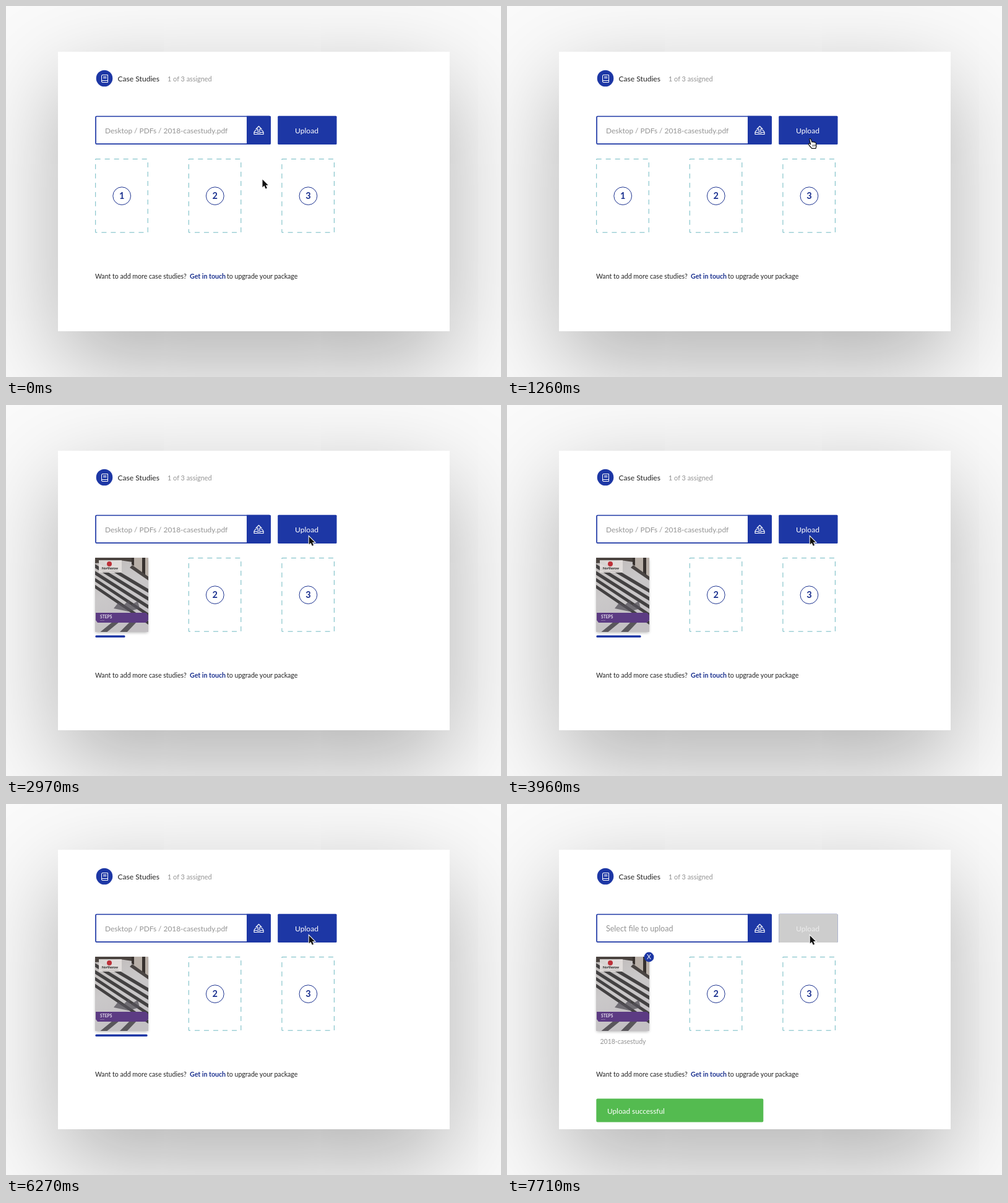
These frames come from a looping animation (800x600 px, 8 s). An HTML page:

```html
<!DOCTYPE html>
<html lang="en">
<head>
<meta charset="utf-8">
<title>Case study upload</title>
<style>
  html, body { margin: 0; width: 100%; height: 100%; overflow: hidden; background: #fafafa; }
  #card {
    position: absolute; left: 84px; top: 74px; width: 633px; height: 452px;
    background: #fff; box-shadow: 0 50px 150px rgba(0, 0, 0, .3);
  }
  svg { position: absolute; left: 0; top: 0; }
  text { font-family: Lato, "Open Sans", sans-serif; font-size: 12.1px; fill: #222; }
  .blue { fill: #1d37a5; }
  .line { fill: none; stroke: #fff; stroke-linecap: round; stroke-linejoin: round; }
  .hint { fill: #949494; }
  .small { font-size: 10.6px; }
  .bold { font-weight: 700; fill: #1b318f; }
  .mid { text-anchor: middle; }
  .white { fill: #fff; }
  .slot rect { fill: none; stroke: #70bac2; stroke-dasharray: 8 7; }
  .slot circle { fill: #fff; stroke: #1b318f; }
  .slot text { font-size: 14.5px; }
</style>
</head>
<body>
<div id="card"></div>
<svg width="800" height="600" viewBox="0 0 800 600">
  <defs>
    <clipPath id="cardClip"><rect x="84" y="74" width="633" height="452"/></clipPath>
    <clipPath id="coverClip"><rect width="86" height="120"/></clipPath>
    <filter id="soft" x="-20%" y="-20%" width="140%" height="140%"><feGaussianBlur stdDeviation="2.5"/></filter>
    <filter id="photo"><feGaussianBlur stdDeviation=".7"/></filter>
    <linearGradient id="paving" x2=".4" y2="1">
      <stop stop-color="#bdb8b6"/><stop offset=".5" stop-color="#cac8c9"/><stop offset="1" stop-color="#c3c0c3"/>
    </linearGradient>
  </defs>

  <circle class="blue" cx="159" cy="117" r="13.3"/>
  <path class="line" d="M164.500 120.500h-8.500a1.500 1.500 0 0 0 0 3h8.500v-12h-8.500q-1.500 0-1.500 1.500v9M157.500 114.500h4.500M157.500 116.500h4.500"/>
  <text x="180.500" y="122">Case Studies</text>
  <text class="hint" x="261" y="122" style="font-size:10.900px">1 of 3 assigned</text>

  <rect x="145" y="178.500" width="282" height="44.700" rx="1.500" fill="#fff" stroke="#1d37a5" stroke-width="1.700"/>
  <path class="blue" d="M389 177.700h37q2 0 2 2v42.300q0 2-2 2h-37z"/>
  <path class="line" stroke-width="1.200" d="M404.500 201h-1.500l-2 3v3.500h15v-3.500l-2-3h-1.500M401 204.500h4.500l1 1h4l1-1h4.500M407 203v-4h-3l4.500-4.500 4.500 4.500h-3v4z"/>
  <text class="hint" id="path" x="160" y="206" style="font-size:11.900px">Desktop / PDFs / 2018-casestudy.pdf</text>
  <text class="hint" id="prompt" x="160" y="206" style="font-size:12.500px">Select file to upload</text>

  <rect class="blue" x="439.200" y="177.700" width="95.300" height="46.300" rx="1.500"/>
  <rect id="disabled" x="439.200" y="177.700" width="95.300" height="46.300" rx="1.500" fill="#cdcdcd"/>
  <text class="mid white" id="button" x="486" y="206">Upload</text>

  <g id="slots"></g>

  <g id="cover" transform="translate(144 247)">
    <rect x="1" y="3" width="84" height="118" fill="#000" opacity=".32" filter="url(#soft)"/>
    <g clip-path="url(#coverClip)">
      <rect width="86" height="120" fill="url(#paving)"/>
      <g filter="url(#photo)">
        <g id="shadows" stroke="#434142"></g>
        <path d="M-2-2h62v9L40 4 0 9z" fill="#4a433f"/>
        <path d="M60-2h28v36L60 12z" fill="#b9b0a8"/>
        <path d="M59-2h4v15l-4-2zM76-2h5v30l-5-4z" fill="#38322f"/>
        <path d="M60 12l28 20v6L56 16z" fill="#4a4543"/>
        <path d="M30 82l8-10 8 5 9-9 2 9 12-7 3 12-18 5z" fill="#55525a" opacity=".75"/>
        <path d="M6 122L28 104h11L17 122zM38 122l18-18h11L50 122z" fill="#5a575c"/>
        <rect x="6" y="4" width="37" height="20" fill="#e4dfdd" opacity=".93"/>
        <path d="M1 89h81l4 4v8l-4 4H4l-3-4z" fill="#5c3b83"/>
      </g>
      <circle cx="23" cy="10" r="4" fill="#bd3038"/>
      <text class="mid" x="24" y="19" style="font-size:5.400px;font-weight:700">Northerow</text>
      <path d="M12 22h26" stroke="#aaa5a5" stroke-width=".7"/>
      <text x="8" y="98.300" style="font-size:6.700px;font-weight:700;fill:#e6dfee">STEPS</text>
      <path d="M8 101.500h7" stroke="#9780b1" stroke-width=".7"/>
    </g>
  </g>
  <rect class="blue" id="bar" x="144.400" y="372.500" height="3.600" rx="1.500"/>
  <g id="done">
    <circle class="blue" cx="229.500" cy="247.500" r="7.900"/>
    <text class="mid white" x="229.500" y="251.300" style="font-size:10.500px">X</text>
    <text class="mid hint" x="187.500" y="388" style="font-size:10.500px">2018-casestudy</text>
  </g>

  <text class="small" x="144" y="441">Want to add more case studies?</text>
  <text class="small bold" x="297" y="441">Get in touch</text>
  <text class="small" x="357" y="441">to upgrade your package</text>

  <g clip-path="url(#cardClip)">
    <g id="toast">
      <rect x="144.300" y="476.500" width="270" height="38" rx="2" fill="#54bb50"/>
      <text class="white" x="162" y="500.500" style="font-size:11.800px">Upload successful</text>
    </g>
  </g>

  <g id="cursor">
    <path id="arrow" d="M0 0v12.800l2.900-2.700 2.200 4.900 2.300-1-2.100-4.700h3.900z" fill="#111" stroke="#fff" stroke-width="2" paint-order="stroke"/>
    <g id="hand" stroke="#111">
      <path d="M-1 2.500q1.500-1.500 2.700.6l1.500 4.200q1.200-1 2.200.1 1.300-.8 2.200.4 1.700-.4 2.100 1.500l.6 4.300-1 3.900H3l-3.800-4.300q-2.300-2.700-1.200-3.500 1-.8 3 1.300z" fill="#fff" stroke-width="1.200" stroke-linejoin="round"/>
      <path d="M4.200 11.500l.5 3M6.400 11.200l.4 3M8.500 11l.3 3" stroke-width=".8"/>
    </g>
  </g>
</svg>
<script>
const LOOP = 8000;
const BAR_WIDTH = 84.2;
const $ = id => document.getElementById(id);
const clamp = v => Math.min(1, Math.max(0, v));
const progress = (t, start, end) => clamp((t - start) / (end - start));
const easeOut = p => 1 - (1 - p) ** 2;
const easeInOut = p => p * p * (3 - 2 * p);
const mix = (a, b, p) => a + (b - a) * p;
const fade = (id, opacity) => $(id).setAttribute("opacity", opacity);

$("slots").innerHTML = [1, 2, 3].map((n, i) => `
  <g class="slot" id="slot${n}" transform="translate(${144.7 + i * 150.6} 247.5)">
    <rect width="84.5" height="118.7"/>
    <circle cx="42.500" cy="59.700" r="14.400"/>
    <text class="mid bold" x="42.500" y="64.800">${n}</text>
  </g>`).join("");

// Railing shadows falling across the paving
$("shadows").innerHTML = Array.from({ length: 5 }, (_, i) =>
  `<path d="M-4 ${i * 11}L90 ${i * 13 + 56}" stroke-width="${5.5 - i * .2}"/>`).join("");

function draw(t) {
  const move = easeInOut(progress(t, 150, 1050));
  const x = mix(414.5, 489.7, move), y = mix(280.5, 212.8, move);
  const pointing = x > 439 && y < 224 && t < 1500;
  $("cursor").setAttribute("transform", `translate(${x} ${y})`);
  fade("arrow", pointing ? 0 : 1);
  fade("hand", pointing ? 1 : 0);

  const shown = progress(t, 1500, 1740);
  fade("cover", shown);
  fade("slot1", 1 - shown);

  const loaded = easeOut(progress(t, 1737, 5311));
  const finished = progress(t, 6540, 6780);
  $("bar").setAttribute("width", BAR_WIDTH * loaded);
  fade("bar", 1 - finished);
  fade("path", 1 - finished);
  fade("prompt", finished);
  fade("disabled", finished);
  fade("button", mix(1, .62, finished));
  fade("done", finished);

  const rise = easeOut(progress(t, 7170, 7710));
  $("toast").setAttribute("transform", `translate(0 ${mix(50, 0, rise)})`);
}

function tick() {
  draw(performance.now() % LOOP);
  requestAnimationFrame(tick);
}
tick();
</script>
</body>
</html>
```
